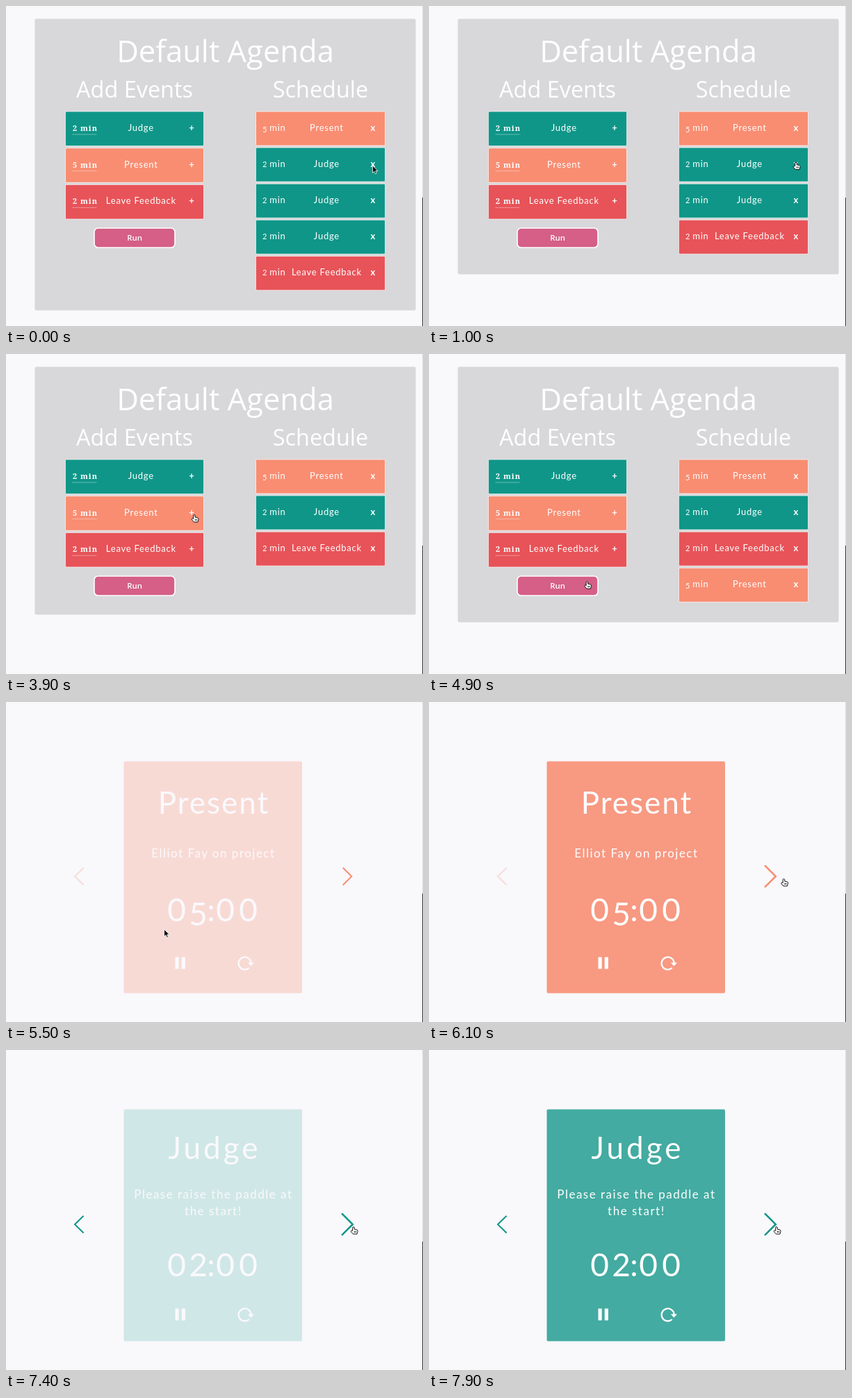
An HTML page that plays this animation: 600x461 px, repeating every 8 s.

```html
<!DOCTYPE html>
<html lang="en">
<head>
<meta charset="utf-8">
<title>Agenda</title>
<style>
  html, body { margin: 0; width: 100%; height: 100%; overflow: hidden; background: #f9f8fb; }
  svg { display: block; width: 600px; height: 461px; }
  text { fill: #fff; }
  .mid { text-anchor: middle; }
  .head { font-family: "Open Sans", "Noto Sans", sans-serif; }
  .sans { font-family: Lato, "Open Sans", sans-serif; }
  .item { font-size: 13px; letter-spacing: .75px; }
  .sign { font-size: 13px; font-weight: 700; }
  .serif { font: 600 11px "Noto Serif", serif; letter-spacing: 1px; }
  .run { font-size: 11.4px; font-weight: 600; }
  .title { font-size: 44px; }
  .note { font-size: 17px; letter-spacing: 1.5px; }
  .clock { font-size: 46px; }
  .row { stroke: #fff; stroke-opacity: .65; }
  .chevron { fill: none; stroke-linecap: round; }
  .arrow { fill: #111; stroke: #fff; stroke-width: .8; }
  .hand { fill: #fff; stroke: #111; stroke-width: 1; stroke-linejoin: round; }
</style>
</head>
<body>
<svg viewBox="0 0 600 461">
  <rect width="600" height="461" fill="#f9f8fb"/>
  <path d="M599 0h1v276h-1z" fill="#dddce0"/>
  <path d="M599 276h1v185h-1z" fill="#333"/>
  <g id="agenda">
    <rect id="panel" x="41.5" y="18.5" width="548" height="420" rx="2" fill="#d8d7d9"/>
    <text class="head mid" x="315.5" y="81" font-size="43.5">Default Agenda</text>
    <text class="head mid" x="185" y="132" font-size="32.4">Add Events</text>
    <text class="head mid" x="452.5" y="132" font-size="32.4">Schedule</text>
    <g id="events"></g>
    <g id="schedule"></g>
    <rect x="127" y="320" width="116" height="28" rx="5.5" fill="#d55f86" stroke="#fff" stroke-width="1.6"/>
    <text class="head run mid" x="185" y="338">Run</text>
  </g>
  <g id="player">
    <g id="present"></g>
    <g id="judge"></g>
    <path id="prev" class="chevron" d="M111 239.5L99 251.2L111 263"/>
    <path id="next" class="chevron"/>
  </g>
  <g id="cursor">
    <path id="arrow" class="arrow" d="M0 0V10.4L2.4 8.2L4 11.8L5.8 11L4.3 7.5H7.6Z"/>
    <path id="hand" class="hand" d="M-1.3 6V.9Q0 -.5 1.2 .9V3.6L5.2 4.6Q6.2 5.2 6 6.6L5 10.6H-.6L-3.6 7.2Q-4 5.6 -2.5 5.4Z M1.4 6.4V8.6M3.3 6.4V8.6"/>
  </g>
</svg>
<script>
const $ = id => document.getElementById(id);
const LOOP = 8000, STEP = 100;
const TEAL = [15, 150, 136], CORAL = [248, 141, 114], RED = [231, 83, 88];
const rgb = c => `rgb(${c.map(Math.round)})`;
const clamp = v => Math.max(0, Math.min(1, v));
const ramp = (t, start, length) => clamp((t - start) / length);
const mix = (a, b, k) => a + (b - a) * k;
const ease = k => k * k * (3 - 2 * k);
const show = (id, on) => $(id).setAttribute('display', on ? 'inline' : 'none');

const KINDS = {
  P: { name: 'Present', min: 5, color: CORAL },
  J: { name: 'Judge', min: 2, color: TEAL },
  L: { name: 'Leave Feedback', min: 2, color: RED }
};

function box(x, y, w, h, color) {
  return `<rect class="row" x="${x}" y="${y}" width="${w}" height="${h}" rx="1.5" fill="${rgb(color)}"/>`;
}

function eventRow(key, i) {
  const { name, min, color } = KINDS[key];
  const y = 152 + i * 52.7, base = y + 28;
  return box(85.5, y, 199, 49.6, color) +
    `<text class="serif" x="96" y="${base}">${min} min</text>
    <path d="M96 ${y + 33}h34.5" stroke="#fff" stroke-opacity=".75" stroke-dasharray="1 1"/>
    <text class="sans item mid" x="194.3" y="${base}">${name}</text>
    <text class="sans sign mid" x="267" y="${base}">+</text>`;
}

function scheduleRow(key, i) {
  const { name, min, color } = KINDS[key];
  const y = 152 + i * 52.1, base = y + 28;
  const drop = min === 5 ? 2 : 0;
  return box(359.5, y, 186, 49, color) +
    `<text class="sans item" x="369" y="${base + drop}" font-size="10"><tspan style="font-size:11px">${min}</tspan></text>
    <text class="sans item" x="379.3" y="${base}">min</text>
    <text class="sans item mid" x="461.4" y="${base}">${name}</text>
    <text class="sans sign mid" x="528" y="${base}">x</text>`;
}

// Low-slung numerals: the 5 hangs below the line
function clock(time, y) {
  const xs = [245.5, 276.5, 295, 315.5, 348.5];
  return [...time].map((c, i) =>
    `<tspan x="${xs[i]}" y="${c === '5' ? y + 6 : y}">${c}</tspan>`).join('');
}

function card(color, title, titleY, gap, lines, lineY, time, timeY, iconY) {
  const notes = lines.map((s, i) =>
    `<text class="sans note mid" x="298.4" y="${lineY + i * 24}">${s}</text>`).join('');
  return `<rect x="169.5" y="85.5" width="256.5" height="334" rx="2" fill="${rgb(color)}"/>
    <text class="sans title mid" x="${298 + gap / 2}" y="${titleY}" letter-spacing="${gap}">${title}</text>
    ${notes}
    <text class="sans clock mid">${clock(time, timeY)}</text>
    <g transform="translate(0 ${iconY})">
      <path d="M243.5 -8.5h5.2v17h-5.2zM252.7 -8.5h5.2v17h-5.2z" fill="#fff"/>
      <path d="M349.8 7A9 9 0 1 1 352.6 0" fill="none" stroke="#fff" stroke-width="2.3"/>
      <path d="M347.8 -.6h9.2l-4.6 5z" fill="#fff"/>
    </g>`;
}

$('events').innerHTML = [...'JPL'].map(eventRow).join('');
$('present').innerHTML = card(CORAL, 'Present', 161, 2, ['Elliot Fay on project'], 224, '05:00', 316, 376);
$('judge').innerHTML = card(TEAL, 'Judge', 157, 4, ['Please raise the paddle at', 'the start!'], 214, '02:00', 326, 381);

const LISTS = [[0, 'PJJJL'], [500, 'PJJL'], [1900, 'PJL'], [4100, 'PJLP']];
const PATH = [
  [0, 527.5, 230], [100, 527.5, 230], [300, 528, 225], [2700, 528, 225],
  [3700, 271, 231.5], [4300, 271, 231.5], [4900, 227.5, 327.5], [5500, 227.5, 327.5],
  [6100, 510.5, 254.5], [6300, 500, 254.5], [LOOP, 500, 254.5]
];
const HANDS = [[200, 2800], [3500, 4400], [4700, 5200], [6000, LOOP]];

function pointAt(t) {
  const i = PATH.findIndex(p => p[0] > t);
  const [t0, x0, y0] = PATH[i - 1], [t1, x1, y1] = PATH[i];
  const k = ease((t - t0) / (t1 - t0));
  return [mix(x0, x1, k), mix(y0, y1, k)];
}

let shown = '';
function setList(list) {
  if (list === shown) return;
  shown = list;
  $('schedule').innerHTML = [...list].map(scheduleRow).join('');
  const bottom = Math.max(375.5, 178 + list.length * 52.1);
  $('panel').setAttribute('height', bottom - 18.5);
}

function draw(t) {
  const playing = t >= 5200;
  show('agenda', !playing);
  show('player', playing);
  setList(LISTS.filter(l => l[0] <= t).pop()[1]);

  $('present').setAttribute('opacity', ramp(t, 5235, 980) * (1 - ramp(t, 6700, 500)));
  $('judge').setAttribute('opacity', ramp(t, 7263, 820));

  const turn = ramp(t, 6700, 400);
  const tint = rgb(CORAL.map((c, i) => mix(c, TEAL[i], turn)));
  const prev = $('prev'), next = $('next');
  prev.setAttribute('stroke', tint);
  prev.setAttribute('stroke-width', 2);
  prev.setAttribute('opacity', mix(.25, 1, turn));
  const grow = ramp(t, 5900, 200);
  const w = mix(6, 7.5, grow), h = mix(12, 15, grow);
  next.setAttribute('d', `M${491.3 - w} ${251.2 - h}L${491.3 + w} 251.2L${491.3 - w} ${251.2 + h}`);
  next.setAttribute('stroke', tint);
  next.setAttribute('stroke-width', mix(2, 2.6, grow));

  const hand = HANDS.some(([a, b]) => t >= a && t < b);
  show('hand', hand);
  show('arrow', !hand);
  $('cursor').setAttribute('transform', `translate(${pointAt(t)})`);
}

const begin = performance.now();
function tick() {
  const t = (performance.now() - begin) % LOOP;
  draw(Math.floor(t / STEP) * STEP);
  requestAnimationFrame(tick);
}
tick();
</script>
</body>
</html>
```
